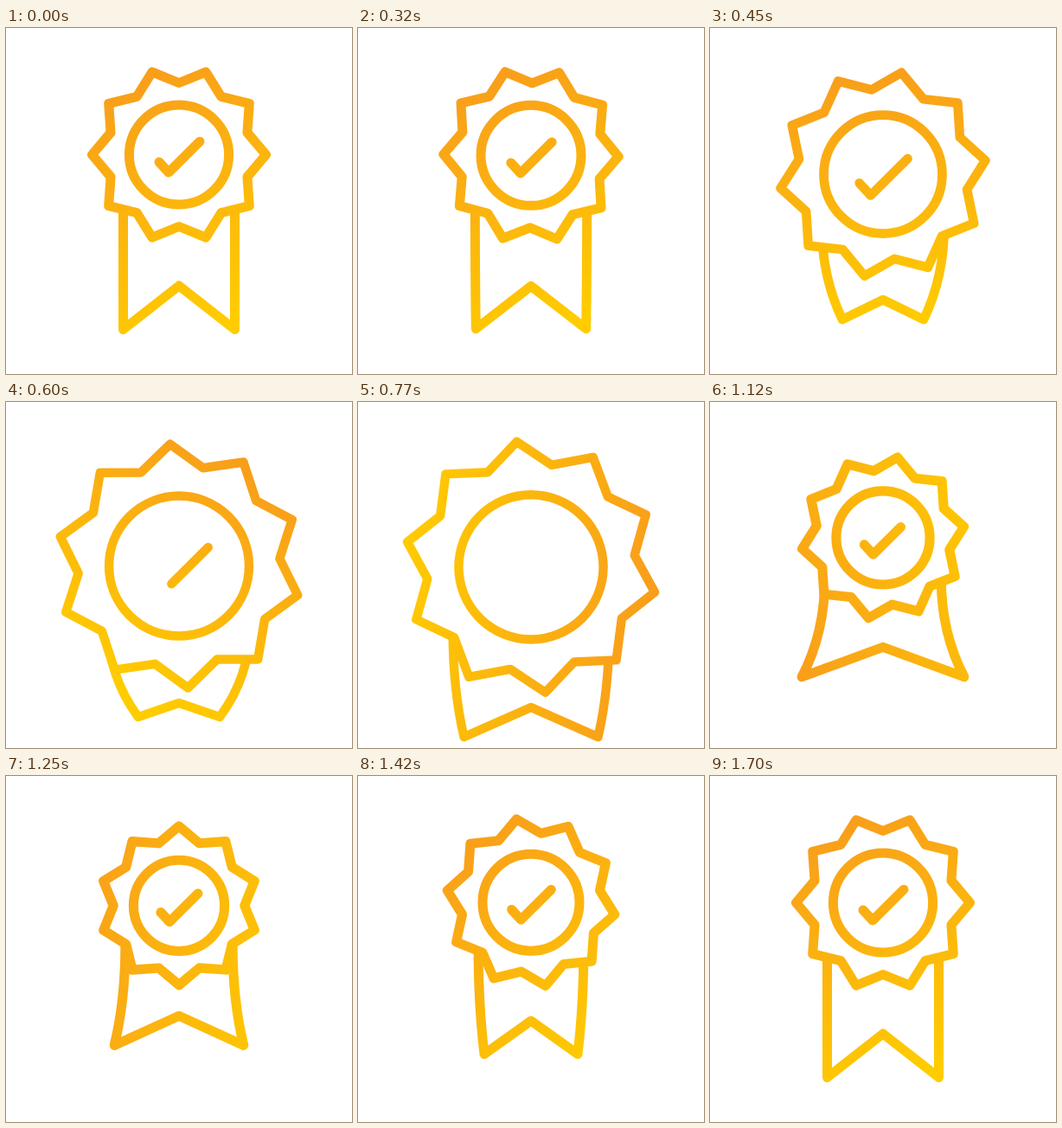
Animation, 400 px wide and 400 px high, one loop 1.72 s. Source, as an HTML page with a canvas:

```html
<!DOCTYPE html>
<html lang="en">
<head>
<meta charset="utf-8">
<title>Award badge</title>
<style>
  html, body { margin: 0; width: 100%; height: 100%; overflow: hidden; background: #fff; }
  canvas { display: block; width: 100vw; height: 100vh; }
</style>
</head>
<body>
<canvas id="stage" width="400" height="400"></canvas>
<script>
const ctx = document.getElementById('stage').getContext('2d');
const LOOP = 1720, BEGIN = 300, END = 1700;
const CX = 200;

// Key poses of the bounce; a spline joins them.
const rest = { time: BEGIN, angle: 0, scale: 1, centerY: 146.5, tailX: 64.5, tailY: 348.5, notchY: 298 };
const poses = [
  rest,
  { time: 450, angle: 28, scale: 1.187, centerY: 169, tailX: 47, tailY: 337, notchY: 314 },
  { time: 600, angle: 85.4, scale: 1.405, centerY: 189.5, tailX: 47, tailY: 364, notchY: 348 },
  { time: 950, angle: 226.8, scale: 1.385, centerY: 184, tailX: 107, tailY: 394, notchY: 342 },
  { time: 1120, angle: 280, scale: 0.94, centerY: 157, tailX: 94, tailY: 318, notchY: 283.5 },
  { time: 1420, angle: 332, scale: 0.972, centerY: 146.2, tailX: 54, tailY: 321.5, notchY: 283 },
  { ...rest, time: END, angle: 360 }
];

const clamp = v => Math.min(1, Math.max(0, v));
const mix = (a, b, u) => a + (b - a) * u;
const progress = (time, from, to) => clamp((time - from) / (to - from));
const radians = degrees => degrees * Math.PI / 180;

function slope(i, key) {
  const before = poses[i - 1], after = poses[i + 1];
  return before && after ? (after[key] - before[key]) / (after.time - before.time) : 0;
}

function poseAt(time) {
  const t = Math.min(END, Math.max(BEGIN, time));
  const i = Math.max(0, poses.findIndex(p => p.time >= t) - 1);
  const a = poses[i], b = poses[i + 1];
  const span = b.time - a.time;
  const u = (t - a.time) / span, v = 1 - u;
  const pose = {};
  for (const key in a) {
    pose[key] = mix(a[key], b[key], u * u * (3 - 2 * u)) +
      span * u * v * (slope(i, key) * v - slope(i + 1, key) * u);
  }
  return pose;
}

// The colour ramp makes one eased turn of its own.
function gradient(time) {
  const p = 1 - Math.pow(1 - progress(time, BEGIN, END), 1.25);
  const a = radians(-25 + 180 * (1 - Math.cos(Math.PI * p)));
  const dx = Math.sin(a) * 155, dy = -Math.cos(a) * 155;
  const ramp = ctx.createLinearGradient(CX + dx, 190 + dy, CX - dx, 190 - dy);
  ramp.addColorStop(0, '#f89c1c');
  ramp.addColorStop(1, '#ffcc00');
  return ramp;
}

function drawRibbon({ scale, centerY, tailX, tailY, notchY }) {
  const topX = mix(rest.tailX * scale, tailX, 0.2);
  const topY = centerY + 50 * scale;
  const bendY = mix(topY, tailY, 0.55);
  ctx.beginPath();
  ctx.moveTo(CX - topX, topY);
  ctx.quadraticCurveTo(CX - topX, bendY, CX - tailX, tailY);
  ctx.lineTo(CX, notchY);
  ctx.lineTo(CX + tailX, tailY);
  ctx.quadraticCurveTo(CX + topX, bendY, CX + topX, topY);
  ctx.stroke();
}

function drawStar({ angle, scale, centerY }) {
  ctx.beginPath();
  for (let i = 0; i < 20; i++) {
    const a = radians(angle + i * 18);
    const r = scale * (i % 2 ? 83 : 100.5);
    ctx.lineTo(CX + r * Math.cos(a), centerY + r * Math.sin(a));
  }
  ctx.closePath();
  ctx.fill();
  ctx.stroke();
}

function drawRing({ scale, centerY }) {
  ctx.beginPath();
  ctx.arc(CX, centerY, 57.6 * scale, 0, Math.PI * 2);
  ctx.stroke();
}

// The tick wipes off from its short end, then draws itself again.
function drawTick({ scale, centerY }, time) {
  const from = time < 780 ? Math.pow(progress(time, 450, 760), 1.4) : 0;
  const to = time < 780 ? 1 : 1 - Math.pow(1 - progress(time, 790, 1220), 2.1);
  if (to - from < 0.005) return;
  const corner = 0.243;
  const at = f => f < corner
    ? [mix(-23, -12, f / corner), mix(8.5, 20.5, f / corner)]
    : [mix(-12, 24, (f - corner) / (1 - corner)), mix(20.5, -15.3, (f - corner) / (1 - corner))];
  ctx.beginPath();
  for (const f of [from, Math.min(to, Math.max(from, corner)), to]) {
    const [x, y] = at(f);
    ctx.lineTo(CX + x * scale, centerY + y * scale);
  }
  ctx.stroke();
}

function draw(time) {
  const pose = poseAt(time);
  ctx.fillStyle = '#fff';
  ctx.fillRect(0, 0, 400, 400);
  ctx.lineCap = ctx.lineJoin = 'round';
  ctx.lineWidth = 11 * Math.pow(pose.scale, -0.15);
  ctx.strokeStyle = gradient(time);
  drawRibbon(pose);
  drawStar(pose);
  drawRing(pose);
  drawTick(pose, time);
}

const start = performance.now();
function tick() {
  draw((performance.now() - start) % LOOP);
  requestAnimationFrame(tick);
}
tick();
</script>
</body>
</html>
```
